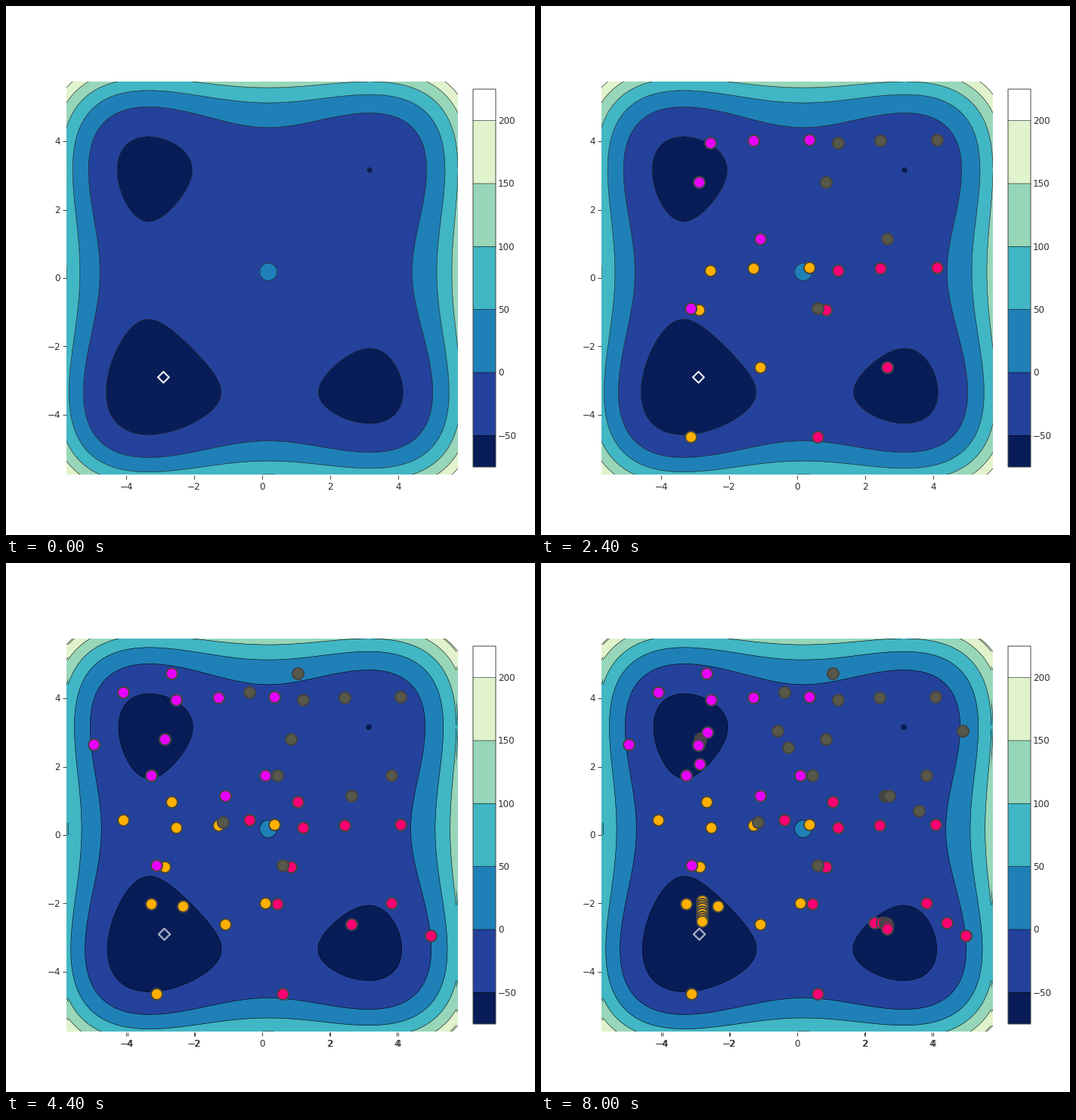
Write a matplotlib script that moves like this. It is 700x700 px and loops after 8.4 s.

```python
import numpy as np
import matplotlib.pyplot as plt
from matplotlib.animation import FuncAnimation
from matplotlib.patches import Polygon, Rectangle

PX = 0.72                      # one pixel in points at 100 dpi
CX, CY = 339, 360              # plot centre
UX, UY = 45.0, 45.2            # pixels per axis unit
NARROW = 0.991                 # x scale once the axis range has grown
GROWN = 11                     # step at which the range grows
STEPS, STEP_MS = 21, 400
SEARCHES = 10
INK, TEXT = "#444444", "#2e2e2e"
LEVELS = np.arange(-50, 201, 50)
BANDS = ["#081d58", "#24429b", "#1f80b8", "#41b6c4", "#97d6b9", "#e0f3cd", "#ffffff"]

# Key points of the sampling phase, repeated in four shifted cells
SAMPLES = np.array([
    (-1.30, 4.03), (0.36, 4.05), (-1.10, 1.15), (-3.14, -0.89), (-2.55, 3.97),
    (-2.90, 2.81), (-3.30, 1.74), (0.08, 1.75), (-2.70, 4.73), (-4.12, 4.19)])
SHIFT = 3.75


def search(probes, start, end, powers=(1, 1)):
    """Far probes at given steps; all other steps creep from start to end."""
    creep = SEARCHES - len(probes)
    k = np.linspace(0, 1, creep)
    ease = np.column_stack([1 - (1 - k) ** powers[0], k ** powers[1]])
    near = iter(np.array(start) + ease * (np.array(end) - start))
    return [probes[i] if i in probes else next(near) for i in range(SEARCHES)]


GROUPS = [
    ("#ffb000", (0, -1),
     search({0: (-2.36, -2.09)}, (-2.83, -1.93), (-2.83, -2.53))),
    ("#ff0073", (1, -1),
     search({0: (5.01, -2.95), 1: (4.44, -2.57)}, (2.29, -2.57), (2.66, -2.74), (6, 3))),
    ("#e800ff", (0, 0),
     search({0: (-5.00, 2.65), 3: (-2.89, 2.09), 6: (-2.67, 3.01)},
            (-2.88, 2.83), (-2.93, 2.63))),
    ("#58584a", (1, 0),
     search({0: (-1.17, 0.38), 1: (-0.58, 3.05), 2: (4.91, 3.06), 4: (-0.27, 2.56),
             5: (3.61, 0.71)}, (2.61, 1.14), (2.73, 1.16))),
]

fig = plt.figure(figsize=(7, 7), dpi=100, facecolor="white")
ax = fig.add_axes([0, 0, 1, 1])
ax.axis("off")
ax.set_xlim(0, 700)
ax.set_ylim(700, 0)
ax.autoscale(False)

t = np.linspace(-5, 5, 601)
well = (t**4 - 16 * t**2 + 5 * t) / 2
surface = well[None, :] + well[:, None]


def to_px(x, y, scale):
    return CX + UX * scale * x, CY - UY * y


def label(x, y, value, ha):
    text = str(value).replace("-", "\u2212")
    return ax.text(x, y + 4.2, text, ha=ha, va="baseline", color=TEXT,
                   fontsize=12 * PX, family="DejaVu Sans", zorder=6)


def segment(xs, ys):
    return ax.plot(xs, ys, color=INK, lw=PX, solid_capstyle="butt", zorder=6)[0]


def x_axis(scale, values):
    parts = []
    for v in values:
        x = CX + UX * scale * v
        parts += [segment([x, x], [621, 626]), label(x, 636, v, "center")]
    return parts


def landscape(scale, z):
    half = 259 * scale
    gx, gy = CX + half * t / 5, CY - 52 * t
    fill = ax.contourf(gx, gy, surface, levels=[-200, *LEVELS], colors=BANDS[:-1],
                       antialiased=True, zorder=z)
    lines = ax.contour(gx, gy, surface, levels=LEVELS, colors="black",
                       linestyles="solid", linewidths=0.55 * PX, zorder=z + 0.1)
    frame = Rectangle((CX - half, 100), 2 * half, 520, transform=ax.transData)
    for part in (fill, lines):
        part.set_snap(False)
        part.set_clip_path(frame)
    return [fill, lines]


def diamond(x, y, r, width, z):
    corners = [(x - r, y), (x, y - r), (x + r, y), (x, y + r)]
    return ax.add_patch(Polygon(corners, fill=False, ec="white", lw=width * PX,
                                joinstyle="miter", snap=False, zorder=z))


def color_bar():
    def bar_y(v):
        return 610 - (v + 75) / 300 * 500
    edges = [-75, *LEVELS, 225]
    for low, high, color in zip(edges, edges[1:], BANDS):
        ax.add_patch(Rectangle((618, bar_y(high)), 30, bar_y(low) - bar_y(high),
                               fc=color, ec="none", zorder=1))
    for v in LEVELS:
        y = bar_y(v)
        ax.plot([618, 648], [y, y], color="black", lw=0.55 * PX, snap=False, zorder=2)
        label(651, y, v, "left")
    ax.add_patch(Rectangle((618, 110), 30, 500, fill=False, ec=INK, lw=PX,
                           snap=False, zorder=3))


# Wide view, always present below the narrow one
landscape(1, 1)
diamond(*to_px(-2.9035, -2.9035, 1), 7.3, 2, 2)
x_axis(1, range(-4, 5, 2))
for v in range(-4, 5, 2):
    y = CY - UY * v
    segment([75, 80], [y, y])
    label(72, y, v, "right")
color_bar()

# Narrow view, lets the wide one show through its white parts
narrow = landscape(NARROW, 3)
for r, width in ((8.1, 1.0), (6.2, 0.5)):
    narrow.append(diamond(*to_px(-2.9035, -2.9035, NARROW), r, width, 4))
narrow += x_axis(NARROW, (-4, -2, 2, 4))

trails = []
for i, (color, cell, steps) in enumerate(GROUPS):
    dots, = ax.plot([], [], "o", ms=15 * PX, mfc=color, mec=INK, mew=2 * PX,
                    snap=False, zorder=7 + i)
    trails.append((dots, np.vstack([SAMPLES + SHIFT * np.array(cell), steps])))


def draw(n):
    grown = n >= GROWN
    for part in narrow:
        part.set_visible(grown)
    scale = NARROW if grown else 1
    for dots, points in trails:
        dots.set_data(*to_px(points[:n, 0], points[:n, 1], scale))
    return [dots for dots, _ in trails]


anim = FuncAnimation(fig, draw, frames=STEPS, interval=STEP_MS, repeat=True,
                     repeat_delay=0, init_func=lambda: draw(0), blit=False)
plt.show()
```
